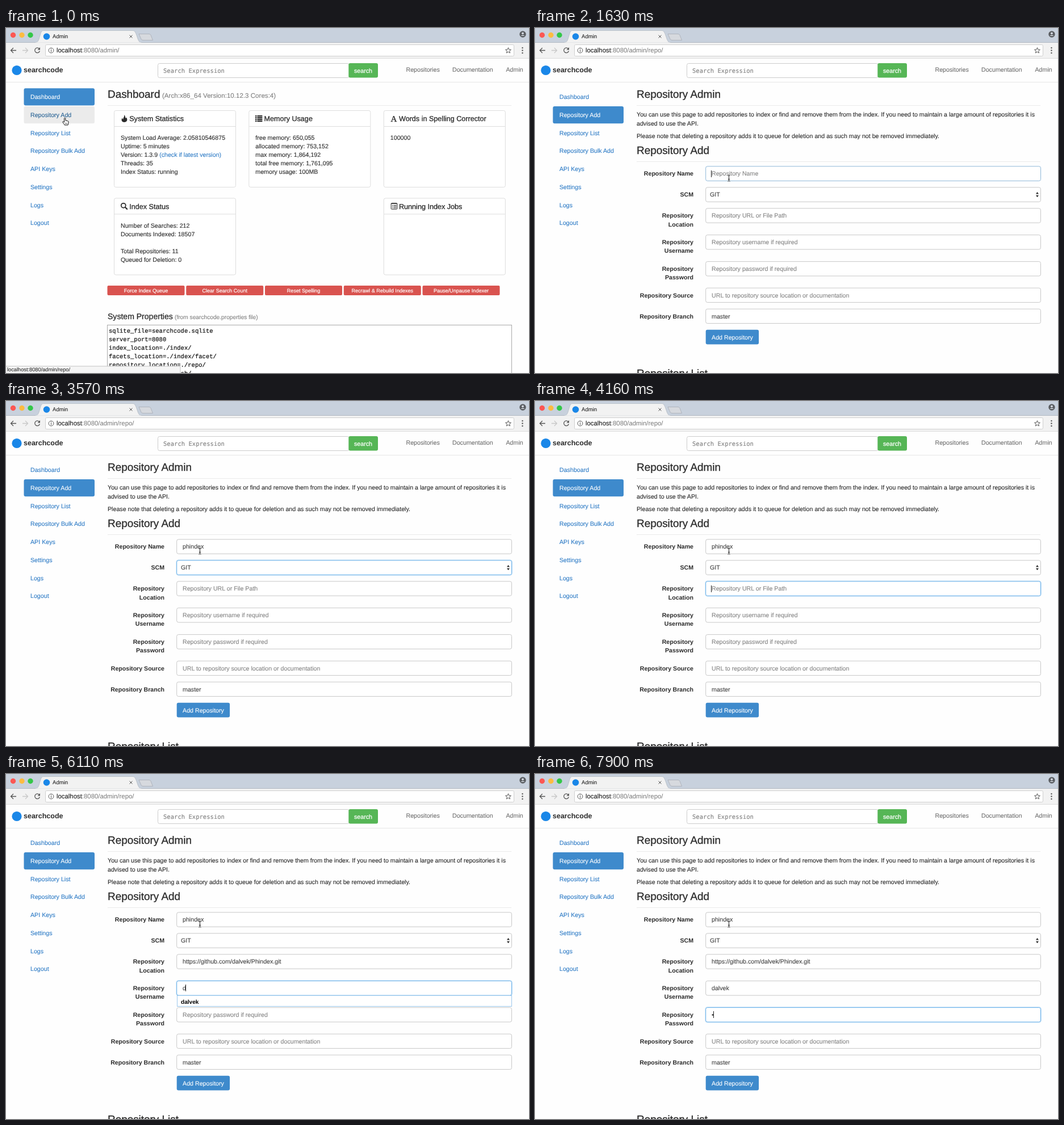
Animation, 921 px wide and 608 px high, one loop 8000 ms. Source, as an HTML page:

```html
<!DOCTYPE html>
<html lang="en">
<head>
<meta charset="utf-8">
<title>Admin</title>
<style>
  html, body { margin: 0; width: 100%; height: 100%; overflow: hidden; background: #fefefe; }
  svg { display: block; font-family: "Liberation Sans", Arial, sans-serif; }
  text { white-space: pre; text-rendering: geometricPrecision; }
</style>
</head>
<body>
<svg id="stage" width="921" height="608" viewBox="0 0 921 608"></svg>
<script>
const BODY = 10.67, LINE = 15.1, LOOP = 8000;
const INK = '#2b2b2b', LINK = '#2f7cc6', BLUE = '#3e8acc', RULE = '#eaeaea';

const text = (x, y, s, o = {}) => {
  const { size = BODY, fill = INK, bold, anchor = 'start', mono, heavy = .12, id } = o;
  return `<text x="${x}" y="${y}" font-size="${size}" fill="${fill}" text-anchor="${anchor}"` +
    (bold ? ' font-weight="700"' : '') + (id ? ` id="${id}"` : '') +
    (mono ? ` font-family="${mono}, monospace"` : '') +
    (bold ? '' : ` stroke="${fill}" stroke-width="${heavy}"`) + `>${s}</text>`;
};
const rect = (x, y, w, h, fill, stroke = 'none', r = 0, extra = '') =>
  `<rect x="${x}" y="${y}" width="${w}" height="${h}" rx="${r}" fill="${fill}" stroke="${stroke}" ${extra}/>`;
const circle = (x, y, r, fill, extra = '') => `<circle cx="${x}" cy="${y}" r="${r}" fill="${fill}" ${extra}/>`;
const path = (d, fill = 'none', stroke = 'none', width = 1, extra = '') =>
  `<path d="${d}" fill="${fill}" stroke="${stroke}" stroke-width="${width}" ${extra}/>`;
const group = (id, body) => `<g id="${id}">${body}</g>`;
const heading = (y, s) => text(179, y, s, { size: 18.9, heavy: .3 });
const rule = y => path(`M179 ${y}H890`, 'none', RULE);
const lines = (x, y, list, o) => list.map((s, i) => text(x, y + i * LINE, s, o)).join('');

// Browser window
function browser() {
  const star = Array.from({ length: 10 }, (_, i) => {
    const a = i * Math.PI / 5, r = i % 2 ? 2.3 : 5.2;
    return `${884.5 + r * Math.sin(a)} ${39.8 - r * Math.cos(a)}`;
  }).join('L');
  return rect(0, 0, 921, 26, '#c8d1dd') + path('M0 25.5H921', 'none', '#b3bac4') +
    rect(0, 26, 921, 28, '#f2f2f2') +
    circle(12.5, 12.5, 4.7, '#fc5753') + circle(28, 12.5, 4.7, '#fdbc40') + circle(43, 12.5, 4.7, '#33c748') +
    path('M52 26C57 25 58 20 60 13S63 4.5 67 4.5H223C227 4.5 228 8 230 13S233 25 238 26Z', '#f2f2f2', '#b4bbc5', .8) +
    rect(52, 25.6, 186, 2, '#f2f2f2') +
    group('favicon', circle(71.5, 15, 5.8, '#1a87e8')) +
    group('spinner', path('M71.5 10A5 5 0 1 1 66.5 15', 'none', '#8a8f96', 1.6)) +
    text(82, 18.4, 'Admin', { size: 9.6 }) +
    path('M217.5 12.5l5 5m0-5l-5 5', 'none', '#555') +
    path('M234 10.5H252Q254 10.5 255 12.5L258.5 21.5H241Q239 21.5 238 19.5Z', '#d6d9de', '#a8adb5', .8) +
    circle(910, 11, 5.7, '#5a5d61') + circle(910, 9.3, 1.9, '#d5dae2') + path('M906.5 14Q910 10.5 913.5 14Z', '#d5dae2') +
    path('M18 39.5H8.5m4.5-4.5l-4.5 4.5 4.5 4.5', 'none', '#555', 1.3) +
    path('M29 39.5H38.5m-4.5-4.5l4.5 4.5-4.5 4.5', 'none', '#c8c8c8', 1.3) +
    path('M58.8 36.8A4.4 4.4 0 1 0 59.4 40.5', 'none', '#555', 1.3) + path('M60 34v4.5h-4.5Z', '#555') +
    rect(69.5, 29.5, 825, 20, '#fff', '#cfcfcf', 2) +
    circle(79.5, 39.5, 4.4, 'none', 'stroke="#555"') + path('M79.5 38.8V42M79.5 36.8V38', 'none', '#555', 1.1) +
    text(89, 43.3, 'localhost<tspan fill="#777" stroke="none">:8080/admin/<tspan id="urlTail">repo/</tspan></tspan>', { size: 11.37, fill: '#222' }) +
    path(`M${star}Z`, 'none', '#555', 1) +
    [35, 39.5, 44].map(y => circle(909.5, y, 1.2, '#555')).join('') +
    path('M0 53.5H921', 'none', '#dcdcdc');
}

function navbar() {
  return path('M0 95.5H921', 'none', '#e7e7e7') +
    circle(19, 74.5, 8.6, '#1a87e8') +
    text(31, 78.3, 'searchcode', { size: 12.5, bold: 1 }) +
    rect(267.5, 62.5, 337, 25, '#fff', '#ccc', 3) +
    text(277, 78.5, 'Search Expression', { size: 10.55, fill: '#808080', mono: 'DejaVu Sans Mono' }) +
    rect(603.3, 62, 51.7, 25.5, '#56b656', 'none', 3) +
    text(629, 78.5, 'search', { fill: '#fff', heavy: .25, anchor: 'middle' }) +
    [[704.5, 'Repositories'], [786, 'Documentation'], [880.5, 'Admin']]
      .map(([x, s]) => text(x, 77.2, s, { fill: '#707070' })).join('');
}

const menu = ['Dashboard', 'Repository Add', 'Repository List', 'Repository Bulk Add', 'API Keys', 'Settings', 'Logs', 'Logout'];
const sidebar = (active, hover) => menu.map((s, i) => {
  const y = 106.3 + i * 31.7;
  const back = i == active ? BLUE : i == hover ? '#ebebeb' : 'none';
  const fill = i == active ? '#fff' : i == hover ? '#2a6496' : LINK;
  return rect(31.5, y, 124.5, 30.2, back, 'none', 3) + text(43, y + 19, s, { fill });
}).join('');

// Dashboard page
const listIcon = (x, y) => [0, 3, 6, 9].map(d => rect(x, y + d, 2.4, 2.2, INK) + rect(x + 3.4, y + d, 9, 2.2, INK)).join('');

function panel(x, y, icon, title, rows) {
  return rect(x + .5, y + .5, 214, 135, '#fff', '#ddd', 3) + path(`M${x + 1} ${y + 28.5}h213`, 'none', '#ddd') +
    icon + text(x + 27.2, y + 19.4, title, { size: 12.6, heavy: .3 }) + lines(x + 12, y + 52, rows);
}

function dashboard() {
  const fire = path('M208 153C211 156 209.5 158 211 159L212 157.5C215 162 212.5 166 208.5 166C203 166 202.5 161 205 158.5C205 160 205.5 160.5 206.5 161C206 158 209 157 208 153Z', INK);
  const lens = circle(206.8, 312.8, 4, 'none', `stroke="${INK}" stroke-width="1.7"`) + path('M209.8 315.8l4 4', 'none', INK, 2.2);
  const board = rect(678.2, 308.7, 10.6, 10.6, 'none', INK, 1) + path('M678 309.5h11M680 312.5h1.5m1 0h5M680 314.7h1.5m1 0h5M680 317h1.5m1 0h5', 'none', INK, 1.1);
  const letter = text(677.5, 165, 'A', { size: 15, mono: 'Liberation Serif', heavy: .3 });
  const version = `Version: 1.3.9 <tspan fill="${LINK}" stroke="${LINK}">(check if latest version)</tspan>`;
  const buttons = ['Force Index Queue', 'Clear Search Count', 'Reset Spelling', 'Recrawl &amp; Rebuild Indexes', 'Pause/Unpause Indexer'];
  const props = ['sqlite_file=searchcode.sqlite', 'server_port=8080', 'index_location=./index/',
    'facets_location=./index/facet/', 'repository_location=./repo/', 'trash_location=./trash/'];
  return sidebar(0, 1) + heading(123, 'Dashboard') +
    text(275, 123, '(Arch:x86_64 Version:10.12.3 Cores:4)', { size: 11.59, fill: '#808080' }) + rule(136.5) +
    panel(190, 145, fire, 'System Statistics', ['System Load Average: 2.05810546875', 'Uptime: 5 minutes', version, 'Threads: 35', 'Index Status: running']) +
    panel(427.3, 145, listIcon(439, 154), 'Memory Usage', ['free memory: 650,055', 'allocated memory: 753,152', 'max memory: 1,864,192', 'total free memory: 1,761,095', 'memory usage: 100MB']) +
    panel(664.8, 145, letter, 'Words in Spelling Corrector', ['100000']) +
    panel(190, 299.5, lens, 'Index Status', ['Number of Searches: 212', 'Documents Indexed: 18507', '', 'Total Repositories: 11', 'Queued for Deletion: 0']) +
    panel(664.8, 299.5, board, 'Running Index Jobs', []) +
    buttons.map((s, i) => {
      const x = 178.5 + i * 138.75;
      return rect(x, 454, 136, 17, '#d9534f', 'none', 2) +
        text(x + 68, 465.7, s, { size: 9.05, fill: '#fff', heavy: .2, anchor: 'middle' });
    }).join('') +
    text(179, 513, 'System Properties', { size: 14.05, heavy: .3 }) +
    text(297, 513, '(from searchcode.properties file)', { size: 10.2, fill: '#808080' }) +
    rect(178.5, 523.5, 712, 100, '#fff', '#a9a9a9') +
    lines(181, 536.7, props, { size: 10.55, fill: '#111', mono: 'Liberation Mono', heavy: .2 });
}

// Repository form page: centre line, label, placeholder
const fields = [
  [256.5, ['Repository Name'], 'Repository Name'],
  [293.5, ['SCM'], ''],
  [330.5, ['Repository', 'Location'], 'Repository URL or File Path'],
  [377.3, ['Repository', 'Username'], 'Repository username if required'],
  [424.2, ['Repository', 'Password'], 'Repository password if required'],
  [470.8, ['Repository Source'], 'URL to repository source location or documentation'],
  [507.8, ['Repository Branch'], '']
];

const form = () => sidebar(1) + heading(123, 'Repository Admin') + rule(136.5) +
  lines(179, 156.4, ['You can use this page to add repositories to index or find and remove them from the index. If you need to maintain a large amount of repositories it is', 'advised to use the API.']) +
  text(179, 193.9, 'Please note that deleting a repository adds it to queue for deletion and as such may not be removed immediately.') +
  heading(222, 'Repository Add') + rule(235.5) +
  fields.map(([y, label], i) =>
    lines(279, y + 3.9, label, { bold: 1, size: 10.6, anchor: 'end' }) +
    rect(300.7, y - 12.6, 589.8, 25.4, 'none', '#66afe9', 3, `id="glow${i}" stroke-width="3"`) +
    rect(300.7, y - 12.6, 589.8, 25.4, '#fff', '#ccc', 3, `id="box${i}"`) +
    text(i == 1 ? 308 : 311, y + 3.8, '', { id: 'value' + i })).join('') +
  path('M882 292.5l2.5-3.5 2.5 3.5ZM882 294.8l2.5 3.5 2.5-3.5Z', INK) +
  rect(300.7, 531.8, 93.4, 25.7, BLUE, 'none', 3) +
  text(347.5, 548.6, 'Add Repository', { fill: '#fff', anchor: 'middle' }) +
  heading(615.3, 'Repository List') +
  group('suggest', rect(301.5, 0, 589, 19, '#fff', '#9cc8ec') + text(308, 14, '', { id: 'hint', size: 10.1, bold: 1, fill: '#000' })) +
  rect(0, 0, 1, 12, '#222', 'none', 0, 'id="caret"');

const status = rect(-1, 596, 308, 14, '#f5f5f5', '#c2c2c2', 2) +
  text(2, 605.2, 'localhost:8080/admin/repo/', { size: 9.25, fill: '#333' });
const hand = path('M-1 1.2Q0-1 1.2 1V5L5 5.8Q6.8 6.2 6.5 8L5.5 13H-.5C-1.5 10.5-3 9.5-4 7.500Q-3.5 6-2 7.2L-1 8.2Z', '#fff', '#111', 1, 'stroke-linejoin="round"') +
  path('M1.2 9v2.5M3.2 9v2.5', 'none', '#111', .7);
const ibeam = path('M339.5 259.5Q341.5 259.5 341.5 261V268.5Q341.5 270 339.5 270M343.5 259.5Q341.5 259.5 341.5 261M341.5 268.5Q341.5 270 343.5 270M340 266.5H343', 'none', '#222');

const el = {};
const stage = document.getElementById('stage');
stage.innerHTML = browser() + navbar() + group('dash', dashboard()) + group('form', form()) +
  group('status', status) + group('hand', hand) + group('ibeam', ibeam);
stage.querySelectorAll('[id]').forEach(e => el[e.id] = e);

// Timeline
const USER = 'dalvek', URL_TEXT = `https://github.com/${USER}/Phindex.git`;
const focusStart = [1630, 3420, 4010, 5060, 7000];
const nameKeys = [2080, 2220, 2520, 2520, 2670, 2820, 3120];
const userKeys = [6110, 6260, 6410, 6560, 6710, 6710];
const typed = (word, keys, t) => word.slice(0, keys.filter(k => t >= k).length);
const show = (id, on) => el[id].setAttribute('display', on ? 'inline' : 'none');
const within = (t, a, b) => t >= a && t < b;
const level = (t, at) => t < at ? 0 : t < at + 150 ? .5 : 1;
const mix = k => `rgb(${[[200, 102], [200, 175], [200, 233]].map(([a, b]) => Math.round(a + (b - a) * k))})`;

function draw(t) {
  const onForm = t >= 440;
  show('dash', !onForm);
  show('form', onForm);
  show('spinner', within(t, 300, 540));
  show('favicon', !within(t, 300, 540));
  el.urlTail.textContent = t >= 300 ? 'repo/' : '';
  el.status.setAttribute('opacity', t < 540 ? 1 : t < 680 ? .6 : 0);

  const go = t < 1190 ? 0 : t < 1340 ? .5 : 1;
  el.hand.setAttribute('transform', `translate(${103.6 - 33 * go} ${158 + 29 * go})`);
  show('hand', t < 1630);
  show('ibeam', t >= 1630);
  if (!onForm) return;

  const values = [typed('phindex', nameKeys, t), 'GIT', t >= 4760 ? URL_TEXT : '',
    typed(USER, userKeys, t), t >= 7900 ? '•' : '', '', 'master'];
  fields.forEach(([, , placeholder], i) => {
    const k = level(t, focusStart[i] ?? LOOP) - level(t, focusStart[i + 1] ?? LOOP);
    const value = el['value' + i], fill = values[i] ? '#444' : '#858585';
    el['box' + i].setAttribute('stroke', mix(k));
    el['glow' + i].setAttribute('opacity', .3 * k * k);
    value.textContent = values[i] || placeholder;
    value.setAttribute('fill', fill);
    value.setAttribute('stroke', fill);
  });

  const hint = within(t, 2080, 3420) ? [0, 'phindex'] : within(t, 4760, 5060) ? [2, URL_TEXT] :
    within(t, 6110, 7000) ? [3, USER] : null;
  show('suggest', hint);
  if (hint) {
    el.hint.textContent = hint[1];
    el.suggest.setAttribute('transform', `translate(0 ${Math.round(fields[hint[0]][0] + 12.4) + .5})`);
  }

  const now = focusStart.filter(s => t >= s).length - 1;
  const blinkOff = within(t, 5660, 6110) || within(t, 7600, 7900);
  show('caret', now >= 0 && now != 1 && !blinkOff);
  if (now >= 0) {
    const width = values[now] ? el['value' + now].getComputedTextLength() : 0;
    el.caret.setAttribute('x', Math.round(310.2 + width));
    el.caret.setAttribute('y', Math.round(fields[now][0] - 6));
  }
}

function tick() {
  draw(performance.now() % LOOP);
  requestAnimationFrame(tick);
}
tick();
</script>
</body>
</html>
```
